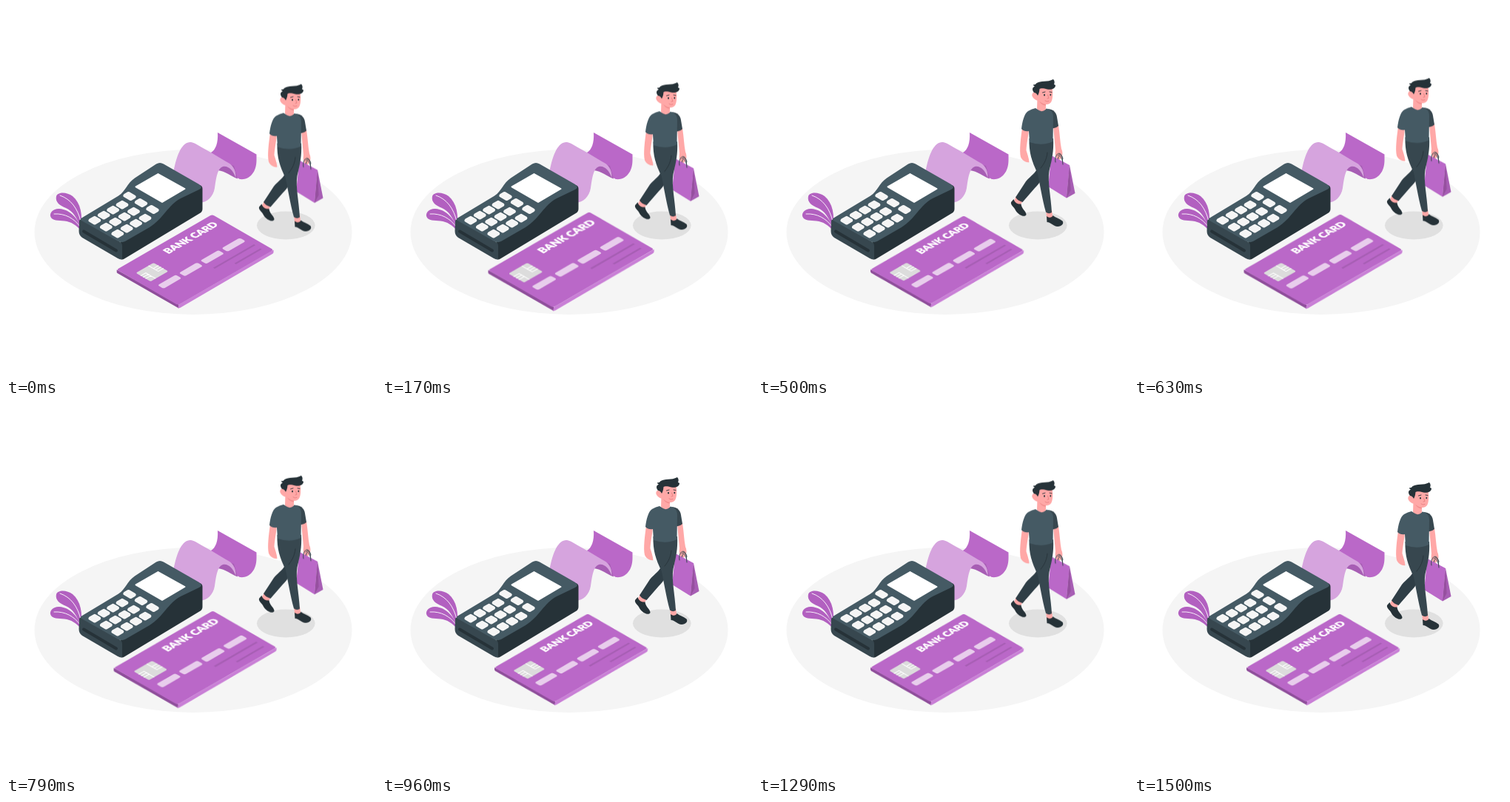
Write an HTML page that moves like this. It is 500 px wide and 500 px high and loops after 1540 ms.

```html
<!DOCTYPE html>
<html lang="en">
<head>
<meta charset="utf-8">
<title>Card payment</title>
<style>
  html, body { margin: 0; width: 100%; height: 100%; overflow: hidden; background: #fff; }
  svg { display: block; width: 100vw; height: 100vh; }
  .man, .card { animation: float 1540ms linear -37ms infinite; }
  .card { animation-name: beat; transform-origin: 255.5px 345.3px; }
  @keyframes float { 50% { transform: translateY(-10px); } }
  @keyframes beat {
    0%, 30%, 40%, 60%, 100% { transform: scale(1); }
    10%, 50% { transform: scale(1.1); }
  }
  .line { fill: none; stroke-linecap: round; stroke-linejoin: round; }
  .title { font: 900 13.1px Lato, sans-serif; fill: #fff; stroke: #fff; stroke-width: .35; }
</style>
</head>
<body>
<svg viewBox="0 0 500 500">
  <ellipse cx="253" cy="305.5" rx="214.5" ry="111.5" fill="#f5f5f5"/>
  <ellipse cx="378.3" cy="296.5" rx="39.3" ry="19" fill="#e0e0e0"/>

  <g class="plant" fill="#b260c0">
    <path d="M101 300C104 283 101 266 90 257C82 251 70 251 68 257C66 265 73 270 81 273C90 277 96 286 101 300Z"/>
    <path d="M102 304C99 288 87 275 72 274C64 273.500 59 279 60 284C62 291 71 289.500 79 290.500C88 291.500 95 296 102 304Z"/>
    <path class="line" stroke="#fff" stroke-width=".9" d="M73 256C88 261 97 274 101 291M65 281C80 280 92 287 100 298"/>
  </g>

  <g class="receipt">
    <path fill="#ba68c8" d="M286 171L338.500 200.500V208C338.500 226 328 235.500 316 234L275 212L277 198C283 195 287 185 286 171Z"/>
    <path fill="#a75eb4" d="M286 222L296 212L308 216L313 233.500C303 230 297 223 286 222Z"/>
    <path fill="#d6a4de" d="M226 226C231 198 239 183 250 184C255 184.500 262 190 277 198L297 210C306 214 311 221 310.500 232C307 222 300 215 293 217C285 220 284 234 282 246C280 258 272 265 262 266Z"/>
  </g>

  <g class="terminal">
    <path fill="#263238" d="M155 318L200 270L262 242Q265.500 243 265.500 247V274Q265.500 278 262 280L160 341.500Q157 343.500 153 341Z"/>
    <path fill="#37474f" d="M99 291Q99 287 104 290L153 318Q157 320 157 324V342.500Q155 343 151 341L103 313Q98.500 310 98.500 304Z"/>
    <path fill="#455a64" d="M103 286L152 256.500C162 250 163 240 174 232.500L203 213.500Q208 210.500 213 213.500L261 241Q267 245 261 248L236 260C219 269 212 288 194 299L161 318Q156 320.500 151 317.500L102 290Q99 288 103 286Z"/>
    <path class="line" stroke="#263238" stroke-width="4" d="M105 304.500L149 330.500"/>
    <path fill="#fff" stroke="#fff" stroke-width="2" stroke-linejoin="round" d="M205.500 227L241.500 247L211 265L175.500 244.300Z"/>
    <path class="keys" fill="#f5f5f5" stroke="#f5f5f5" stroke-width="5" stroke-linejoin="round"/>
  </g>

  <g class="card">
    <path fill="#8f4e9b" d="M152 356L234 402V407L153 360.700Q152 360 152 359Z"/>
    <path fill="#c97fd6" d="M234 402L359 330V333Q359 334.500 357 335.500L236 406.200L233 407Z"/>
    <g transform="matrix(.866 -.5 .866 .5 152 356)">
      <rect width="145.500" height="93.500" rx="3" fill="#ba68c8"/>
      <text class="title" x="60" y="19">BANK CARD</text>
      <rect x="10.300" y="19" width="27" height="22.500" rx="2" fill="#dcdcdc"/>
      <path class="line" stroke="#fff" stroke-width="1.100" d="M10.500 26.500H18V34H10.500M18 30.200H10.500M37 26.500H29.500V34H37M29.500 30.200H37M18 34V41M29.500 26.500V19.500"/>
      <g fill="#e8cdec">
        <rect x="10.700" y="51.800" width="27.500" height="9" rx="2.500"/>
        <rect x="43.200" y="51.800" width="27.500" height="9" rx="2.500"/>
        <rect x="75.700" y="51.800" width="27.500" height="9" rx="2.500"/>
        <rect x="108.200" y="51.800" width="27.500" height="9" rx="2.500"/>
      </g>
      <path stroke="#a75eb4" stroke-width="2.400" d="M76 72.300H138M98 82.600H137.500"/>
    </g>
  </g>

  <g class="man">
    <g class="back-leg">
      <path fill="#ffa8a7" d="M349 264L358 270L354 277L345 272Z"/>
      <path fill="#263238" d="M345.500 268C347 273 351 275 355.500 274.500C356 281 363 285 362.500 289C361 293 352 290 348 283C346 278 341 276 342 272Z"/>
      <path fill="#2f3e46" d="M372 215L386 225C386 240 380 247 374 253L357.500 272Q351 270 348 265.500L362 244C367 238 374 233 376 229Z"/>
    </g>
    <path fill="#ffa8a7" d="M399 169L406 168C408 180 408 190 410 200C413 206 411 214 407 215C402 214 401 208 402 202Z"/>
    <g class="bag">
      <path class="line" stroke="#37474f" stroke-width="1" d="M406 220C403 209 410 202 413 224"/>
      <path fill="#ba68c8" d="M396.500 209L421 222L417 266.500L392 251Z"/>
      <path fill="#a75eb4" d="M421 222L428.500 260L417 266.500Z"/>
      <path fill="#96509f" d="M421 222L422.500 256L417 266.500Z"/>
      <path class="line" stroke="#37474f" stroke-width="1" d="M402 218C400 208 408 201 411 211L412 221M405 209C408 206 411 209 412 213"/>
    </g>
    <path fill="#ffa8a7" d="M389 281L397 283L398.500 294L390 293Z"/>
    <path fill="#263238" d="M390 291C393 293.500 397 293.500 398.500 290C402 293 407 294 411.500 297.500C414 301 410 305 405 305C399 305 396 299 390.500 299Z"/>
    <path fill="#37474f" d="M366.500 186H399C400 203 397 215 393.500 230C391 245 396 265 397 286Q393 288.500 389 285.500C384 268 381 247 377.500 232C370 217 366 205 366.500 186Z"/>
    <path class="line" stroke="#263238" stroke-width=".8" d="M391 205C390 216 385 222 382 226"/>
    <path fill="#ffa8a7" d="M357 172L366 174C365 185 363 193 362.500 202C364 207 366 212 366.500 218C363 219 357 216 355 211C353 202 355 186 357 172Z"/>
    <path fill="#37474f" d="M392 146C400 147 403 151 404 157L406 169Q402 173 397 172Z"/>
    <path fill="#455a64" d="M375 145C380 148 386 149 390 145.500C396 147 399 151 399 157L398.500 190Q384 197 367 191L366 176Q360 177 356 173C357 163 360 152 365 149Q370 146 375 145Z"/>
    <path fill="#ffa8a7" d="M377.500 131L389 136V146.500Q383 152 377 146Z"/>
    <path fill="#f28f8f" d="M380 135.500Q385 139 389 139.500V141.500Q383 141 380 135.500Z"/>
    <path fill="#ffa8a7" d="M378 117L397 115C399 124 398.500 133 396 137C392 142 384 140 380 135C375 135 369 130 370.500 126C372 122.500 376 123 378 126Z"/>
    <path fill="#263238" d="M373 124C370 120 370.500 117 374 115.500Q372 115 372 113Q375 114 376 111.500C382 107 391 110.500 399 106C401 108 401 110.500 400 113Q402 113 402 114.500C401.500 119 396 120.500 391 119.500C386 118 382 118 380.500 119Q380 125 378 128Q376 124 373 124Z"/>
    <g fill="#263238">
      <ellipse cx="387" cy="127.300" rx="1" ry="1.300"/>
      <ellipse cx="395.300" cy="127" rx=".9" ry="1.300"/>
    </g>
    <path class="line" stroke="#263238" stroke-width=".9" d="M384.500 124L388 123M394 123L397 123.500"/>
    <path class="line" stroke="#e77f80" stroke-width=".9" d="M391.500 127L393 131.500L391 132M388 135Q390 137 393 135.500"/>
  </g>
</svg>
<script>
  // Keypad: four rows of square keys, topped by one row of wider keys.
  const key = (x, y, u, v) =>
    `M${x - u - v} ${y - (u - v) * .58}L${x + v - u} ${y - (u + v) * .58}` +
    `L${x + u + v} ${y + (u - v) * .58}L${x + u - v} ${y + (u + v) * .58}Z`;
  let d = "";
  for (let col = 0; col < 3; col++) {
    const dx = col * 15.5, dy = col * 9;
    for (let row = 0; row < 4; row++)
      d += key(119.8 + dx + row * 12.4, 289.7 + dy - row * 7, 2.9, 2.9);
    d += key(167 + dx, 257 + dy, 3.8, 2.3);
  }
  document.querySelector(".keys").setAttribute("d", d);
</script>
</body>
</html>
```
